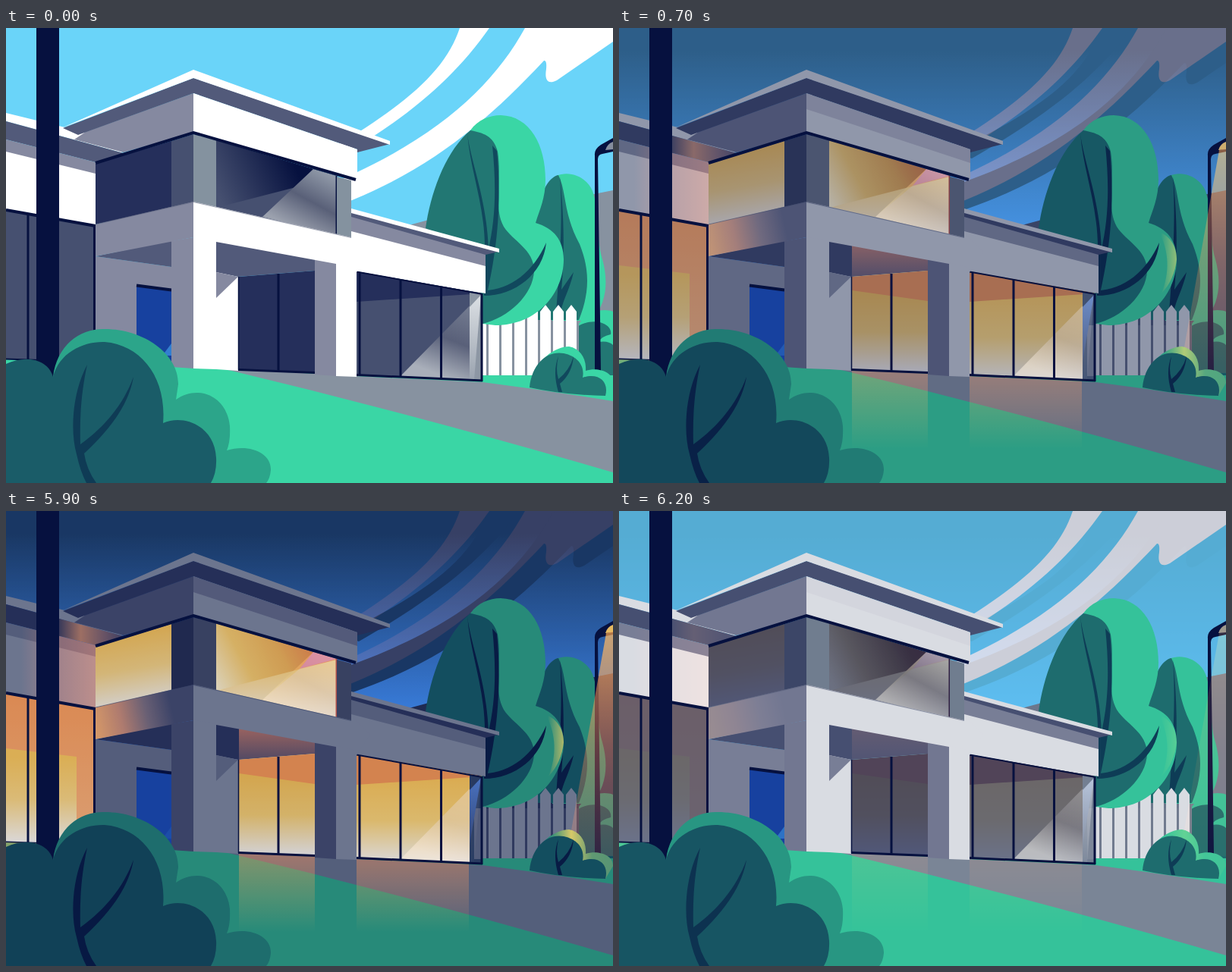
An HTML page that plays this animation: 800 px wide and 600 px high, repeating every 6300 ms.

```html
<!DOCTYPE html>
<html lang="en">
<head>
<meta charset="utf-8">
<title>House from day to night</title>
<style>
html, body { margin: 0; width: 100%; height: 100%; overflow: hidden; background: #06113f; }
svg { display: block; width: 100vw; height: 100vh; }
</style>
</head>
<body>
<svg id="stage" viewBox="0 0 800 600"></svg>
<script>
const NAVY = '#06113f';
let day = '', night = '', defs = '', count = 0;

// Each colour is a [day, night] pair.
const navy = [NAVY, NAVY];
const white = ['#fff', '#485373'];
const under = ['#525a7a', '#1b2550'];
const shade = ['#8589a0', '#29325a'];
const wall = ['#8589a0', '#485373'];
const glass = ['#465070', '#172048'];
const pillar = ['#84929f', '#262e52'];
const leaf = ['#3ad6a5', '#23786f'];
const deep = ['#227773', '#10455b'];
const vein = ['#11485d', NAVY];

function grad(x1, y1, x2, y2, ...stops) {
  const id = 'g' + count++;
  defs += `<linearGradient id="${id}" gradientUnits="userSpaceOnUse" x1="${x1}" y1="${y1}" x2="${x2}" y2="${y2}">` +
    stops.map((c, i) => `<stop offset="${i / (stops.length - 1)}" stop-color="${c}"/>`).join('') + '</linearGradient>';
  return `url(#${id})`;
}

function fill(d, [a, b]) {
  if (a) day += `<path d="${d}" fill="${a}"/>`;
  if (b) night += `<path d="${d}" fill="${b}"/>`;
}

function line(d, width, [a, b] = navy) {
  const rest = `fill="none" stroke-width="${width}"`;
  day += `<path d="${d}" ${rest} stroke="${a}"/>`;
  night += `<path d="${d}" ${rest} stroke="${b}"/>`;
}

function sky() {
  fill('M0,0H800V600H0Z', ['#6ad4f9', grad(0, 30, 0, 265, NAVY, '#2d66d2')]);
  const pale = ['#fff', null], dim = [null, NAVY];
  fill('M598,0C580,55 530,99 430,159L450,164C535,114 593,63 637,0Z', pale);
  fill('M684,0C640,80 560,155 400,217V247C540,203 625,133 709,43Q713,42 712,54C710,66 712,76 726,69L800,18V0Z', pale);
  fill('M634,3C614,61 560,106 440,163L465,172C560,118 629,65 673,3Z', dim);
  fill('M720,3C676,83 596,158 420,215L400,256C556,217 661,135 745,46Q749,45 748,57C746,69 748,79 762,72L800,46V0Z', dim);
  fill('M520,263L557,253 775,219 800,214V400H520Z', ['#8792a0', NAVY]);
}

function ground() {
  fill('M0,437L240,447 620,458H800V600H0Z', leaf);
  fill('M285,449L460,459 628,467Q715,478 800,492V586Q540,510 285,449Z', ['#8792a0', '#485373']);
  const glow = grad(0, 452, 0, 555, 'rgba(255,140,80,.52)', 'rgba(255,165,80,0)');
  fill('M307,451L407,455V555H307Z', [null, glow]);
  fill('M462,459L610,465V555H462Z', [null, glow]);
}

function backTree() {
  fill('M725,195C745,187 766,198 773,215C783,242 777,275 786,305C793,330 794,362 771,386H720Z', leaf);
  fill('M728,194C716,196 705,215 696,250L700,385H755C769,350 770,320 756,285C734,245 739,215 728,194Z', deep);
  fill('M730,196C736,250 736,305 732,345L748,322C743,345 734,358 731,375H725C730,310 734,250 730,196Z', vein);
  fill('M755,390C768,371 790,370 800,374V456H752Z', leaf);
  fill('M753,394C774,380 800,390 797,404Q784,407 781,414Q794,412 800,418V458H752Z', deep);
}

function fence() {
  for (let x = 619; x < 740; x += 17) {
    fill(`M${x + 13},392H${x + 17}V458H${x + 13}Z`, ['#8792a0', '#1b2550']);
    fill(`M${x},374L${x + 7},365 ${x + 14},374V458H${x}Z`, white);
  }
}

function frontTree() {
  fill('M612,135C622,121 637,115 652,115C691,116 711,155 711,200C711,225 703,240 698,257C722,264 735,280 735,305C735,350 700,392 645,392L628,390Z', leaf);
  fill('M612,135C580,162 560,215 553,264L628,300V390C662,382 695,352 696,320C696,292 668,281 656,262C642,237 654,200 648,163C643,142 628,138 612,135Z', deep);
  fill('M608,139C613,180 634,225 636,295H631C632,235 612,190 608,139Z', vein);
  fill('M641,155L647,162C652,215 651,275 634,350H628V295H635C646,250 646,205 641,155Z', vein);
  fill('M712,283C708,325 670,353 630,353V346C665,346 696,320 712,283Z', vein);
  fill('M712,269C728,275 735,290 735,305Q732,332 715,350C726,322 725,295 712,269Z',
    [null, grad(714, 0, 736, 0, '#23786f', '#d6b35a')]);
}

function leftWing() {
  fill('M0,112L110,139 155,165 0,123Z', white);
  fill('M0,123L155,165 118,177 0,147Z', ['#525a7a', grad(65, 0, 165, 0, '#1b2550', '#b0745e', '#6a5060', '#252e58')]);
  const blush = grad(20, 0, 118, 0, '#485373', '#8a646f', '#ac7370');
  fill('M0,147L118,177V193L0,164Z', ['#8589a0', blush]);
  fill('M0,163L118,192V260L0,239Z', ['#fff', blush]);
  fill('M0,241L118,262V437H0Z', ['#465070', grad(0, 245, 0, 437, '#ff984d', '#ffb273')]);
  fill('M0,313L93,324V437H0Z', [null, grad(0, 325, 0, 437, '#ffc64f', '#ffd67a', '#fffaf2')]);
  line('M0,240L118,261', 4);
  line('M29,245V437M116.500,261V437', 3);
  line('M0,436.500L45,438', 2);
}

function tower() {
  fill('M90,147L105,137 247,86V138L155,164Z', shade);
  fill('M75,132L247,66V86L95,141Z', under);
  fill('M247,66L506,153 463,164V160L247,86Z', under);
  fill('M73,132L247,55 506,149V154L247,66Z', white);
  fill('M247,86L463,160V200L247,137Z', white);
  fill('M247,86L463,160V178L247,107Z', [null, '#29325a']);

  fill('M118,179L218,149V238L118,259Z', ['#252f5b', grad(150, 165, 165, 255, '#ffc653', '#ffd880', '#fff8e8')]);
  fill('M218,149L247,140V230L218,238Z', glass);
  fill('M247,140L277,148V238L247,231Z', pillar);
  fill('M277,148L436,195V272L277,238Z', [grad(277, 215, 375, 170, '#465070', NAVY), grad(282, 238, 405, 170, '#fff0c8', '#ffce66', '#ffbc56', '#ff914d')]);
  fill('M277,237L436,196V273Z', ['#465070', grad(0, 202, 0, 268, '#ffcf6c', '#ffe0a0', '#fff4dc')]);
  fill('M405,186L436,195V273L338,249Z', [grad(415, 188, 375, 262, '#9099a8', '#596078', '#9ba1ae'), null]);
  fill('M405,186L436,195 387,208Z', [null, '#ef91a3']);
  fill('M387,208L436,196V273L338,249Z', [null, 'rgba(255,226,200,.45)']);
  line('M435.500,195V273', 2, [NAVY, '#d8604f']);
  fill('M436,196L455,201V277L436,273Z', pillar);
  line('M118,178L247,138 461,200', 4);
}

function rightWing() {
  fill('M455,245L632,297V350L455,322Z', white);
  fill('M455,244L632,297V314L455,268Z', wall);
  fill('M455,243L649,295 632,299 455,249Z', under);
  fill('M455,238L650,291V296L455,244Z', white);

  fill('M462,321L628,350V465L462,458Z', ['#465070', grad(0, 355, 0, 462, '#ffc44d', '#ffd36d', '#fffaf0')]);
  fill('M462,321L628,350 462,361Z', ['#252f5b', '#ff984d']);
  fill('M520,459L626,351V465Z', [grad(600, 365, 565, 455, '#737b90', '#596079', '#a9afba'), 'rgba(255,230,210,.45)']);
  // The corner pane lets the fence behind show through.
  fill('M611,348L628,351V465L611,463Z', ['#8d97a4', '#0f2450']);
  fill('M617,392H627V459H617Z', [null, '#434d70']);
  fill('M611,368L626,352 617,464H611Z', [grad(0, 352, 0, 463, '#dce0e4', '#9ba4b0'), null]);
  fill('M611,368L626,352 611,440Z', [null, grad(622, 355, 612, 430, '#2555b5', '#17306e')]);
  line('M462,321.500L628,351', 2);
  line('M466,322V458M520,332V460M573.500,341V463M627,350V466', 3);
  line('M462,457.500L628,465', 3);
}

function porch() {
  fill('M118,301L218,315V448L118,440Z', wall);
  fill('M172,340L218,346V448H172Z', ['#17419f', '#17419f']);
  fill('M206,432L218,416V432Z', ['#337fd0', null]);
  line('M172,339.500L218,345.500', 4);
  fill('M118,301L218,280V315Z', under);
  fill('M118,259L247,229V276L118,301Z', ['#8589a0', grad(118, 280, 218, 258, '#e79a5b', '#b97863', '#63566a', '#29325a')]);

  fill('M277,276L435,306V313L407,320 306,328 277,322Z', ['#525a7a', grad(0, 288, 0, 326, '#a8645a', '#57485f')]);
  fill('M277,276L307,282V328L277,323Z', under);
  fill('M277,322L306,328V452L277,450Z', white);
  fill('M277,322L306,328 277,356Z', wall);
  fill('M307,328L407,320V455L307,450Z', ['#252f5b', grad(0, 350, 0, 452, '#ffc44d', '#ffd36d', '#fffaf0')]);
  fill('M307,328L407,320V360L307,346Z', [null, '#ff984d']);
  line('M306.500,328V451', 1.500);
  line('M359,324V452', 3);
  line('M306,450.500L407,454.500', 3);

  fill('M407,304L435,309V459L407,457Z', shade);
  fill('M247,229L455,276V270L480,295 462,322 435,317V311L277,282 247,276Z', white);
  fill('M435,309L462,316V460L435,459Z', white);
  fill('M218,281L247,276V449L218,447Z', shade);
  fill('M247,275L277,281V450L247,449Z', white);
  line('M118,259L247,229.500 455,276.500', .6, ['#626a83', '#303b62']);
}

function lamp() {
  fill('M776,452V168Q775,160 784,154L800,145V163L786,166Q780,167 780,173L784,452Z', navy);
  fill('M790,161Q792,153 800,150V160Z', ['#858d9d', '#ffc551']);
  fill('M791,161L800,159V455H739Z', [null, grad(0, 160, 0, 455, 'rgba(255,165,75,.88)', 'rgba(235,125,75,.52)', 'rgba(220,115,85,.25)')]);
}

function smallBush() {
  fill('M691,472C696,437 725,420 742,420C758,423 765,437 764,452C780,447 800,453 800,468L790,485Z',
    ['#3ad6a5', grad(690, 0, 800, 0, '#23786f', '#23786f', '#ffc65a', '#6a8a66', '#5f8568')]);
  fill('M690,474C693,442 714,425 735,429C754,433 763,446 760,461C781,454 795,466 790,485Q735,484 690,474Z', deep);
  fill('M728,433Q724,450 728,463Q743,451 748,433Q746,456 730,469L733,480H728Q720,453 728,433Z', vein);
}

function bigBush() {
  fill('M0,437L42,438 60,455H0Z', [null, '#96965c']);
  fill('M40,0H70V470H40Z', navy);
  fill('M62,460C67,418 98,396 130,397C183,397 228,431 227,470L224,490C252,470 291,484 295,525Q296,545 291,557C320,548 350,560 349,583Q348,594 343,600H0Z',
    ['#2ca58a', '#1b6067']);
  fill('M0,443Q20,434 38,438Q57,443 62,460C70,428 102,413 130,414C179,418 212,462 207,521C235,509 275,525 277,567Q278,586 270,600H0Z',
    ['#1a5c68', '#103b54']);
  fill('M107,444C88,479 84,530 93,562Q98,585 106,600H119Q106,582 103,561C145,522 163,490 168,460C155,496 130,526 98,549C97,513 99,481 107,444Z',
    ['#0f3b55', NAVY]);
}

[sky, ground, backTree, fence, frontTree, leftWing, tower, rightWing, porch, lamp, smallBush, bigBush].forEach(draw => draw());
stage.innerHTML = `<defs>${defs}</defs><g>${day}</g><g id="dark">${night}</g>`;
const dark = document.getElementById('dark');

// Night fades in and out in hard steps of a fifth, 100 ms each.
function tick(now) {
  const t = now % 6300;
  const rise = Math.floor((t - 400) / 100), fall = Math.ceil((6300 - t) / 100);
  dark.setAttribute('opacity', Math.max(0, Math.min(5, rise, fall)) / 5);
  requestAnimationFrame(tick);
}
requestAnimationFrame(tick);
</script>
</body>
</html>
```
